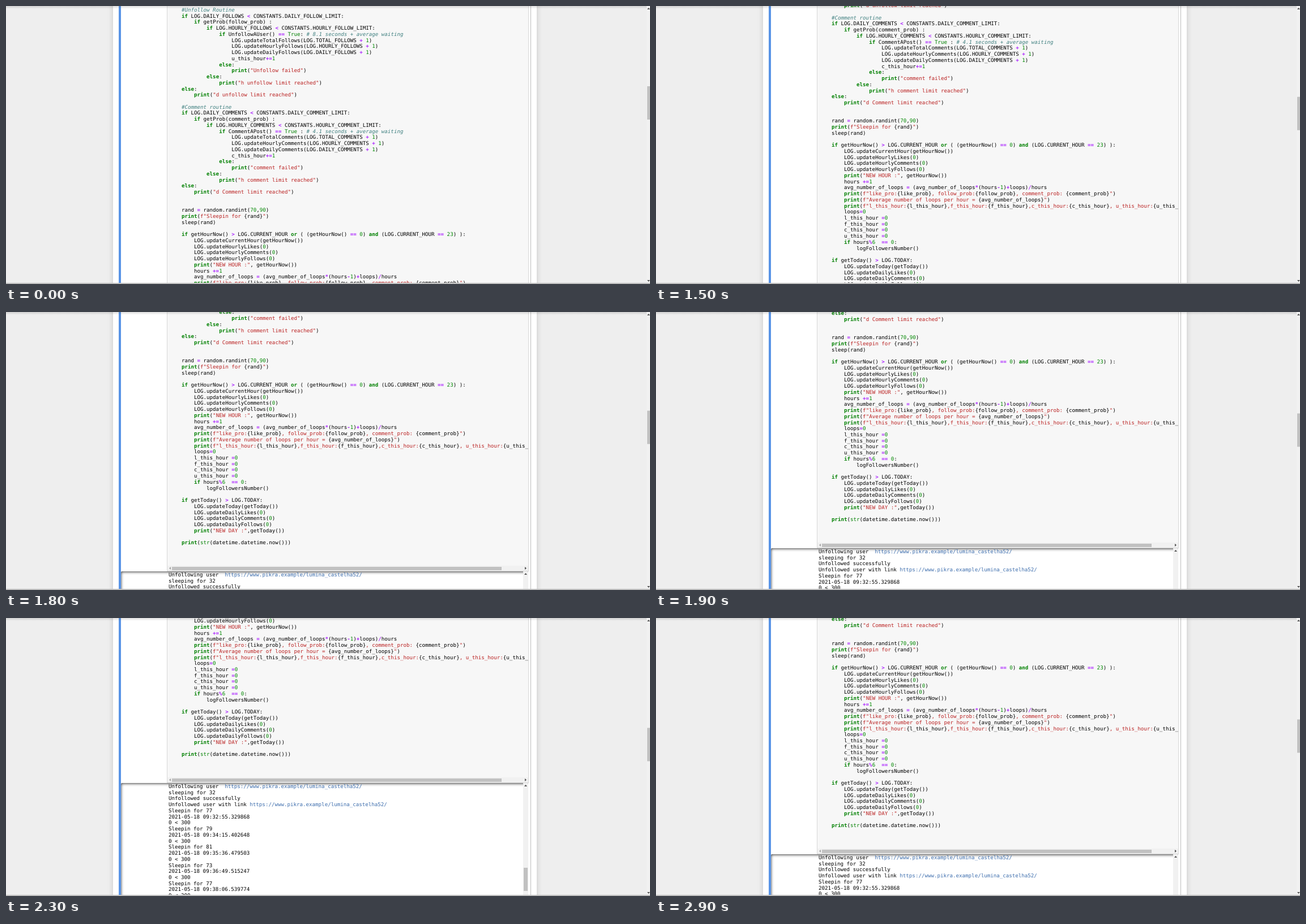
Recreate the animation shown at these times as an HTML page. Size 1137x492 px, loop 3 s.

```html
<!DOCTYPE html>
<html lang="en">
<head>
<meta charset="utf-8">
<title>Notebook scroll</title>
<style>
  html, body { margin: 0; width: 100%; height: 100%; overflow: hidden; background: #eee; }
  div, pre { position: absolute; margin: 0; box-sizing: border-box; }
  #stage { left: 0; top: 0; width: 1137px; height: 492px; overflow: hidden; background: #eee; }
  #paper { left: 189px; top: -20px; width: 748px; height: 540px; background: #fff;
           box-shadow: 0 0 8px 1px rgba(87,87,87,.22); }
  #bar { left: 199px; top: 0; width: 4px; height: 492px; background: #5994e6; }
  #edge { left: 926px; top: 0; width: 1px; height: 492px; background: #bcbcbc; }
  #page { left: 0; top: 0; width: 1137px; height: 1000px; }
  /* the tiny rotation keeps baselines from snapping to whole pixels */
  pre { font: 9.162px/10.727px "DejaVu Sans Mono", monospace; color: #000;
        text-rendering: geometricPrecision; white-space: pre; font-variant-ligatures: none;
        transform: rotate(.005deg); transform-origin: 0 0; }
  #input { left: 284px; top: -20px; width: 639px; height: 754px; overflow: hidden;
           background: #f7f7f7; border: 1px solid #d8d8d8; }
  #code { left: 25px; top: 22.3px; }
  #hbar { left: 0; bottom: 0; width: 637px; height: 9px; background: #f1f1f1; }
  #hbar .thumb { left: 8px; top: 2px; width: 582px; height: 6px; }
  #output { left: 203px; top: 734px; width: 719px; height: 213px; overflow: hidden; background: #fff;
            border-radius: 2px; box-shadow: inset 0 1px 5px rgba(0,0,0,.8); }
  #log { left: 84px; top: 2.2px; }
  #vbar { right: 0; top: 0; width: 9px; height: 213px; background: #f1f1f1; }
  #vbar .thumb { left: 1px; top: 150px; width: 7px; height: 41px; }
  #scrollbar { left: 1131px; top: 0; width: 6px; height: 490px; background: #f1f1f1; }
  #thumb { left: 1px; top: 142px; width: 5px; height: 59px; }
  #top { left: 0; top: 0; width: 1131px; height: 5px;
         background: linear-gradient(rgba(87,87,87,.2), rgba(87,87,87,0)); }
  #bottom { left: 0; top: 490px; width: 1137px; height: 2px; background: #bdbdbd; }
  .thumb { background: #c1c1c1; }
  .arrow { width: 5px; height: 3px; background: #505050; clip-path: polygon(50% 0, 100% 100%, 0 100%); }
  .down { transform: rotate(180deg); }
  .left { transform: rotate(-90deg); background: #a3a3a3; }
  .right { transform: rotate(90deg); }
  .comment { color: #408080; font-style: italic; }
  .string { color: #ba2121; }
  .value { color: #000; }
  .keyword { color: #008000; font-weight: bold; }
  .builtin { color: #008000; }
  .number { color: #008800; }
  .operator { color: #aa22ff; font-weight: bold; }
  .link { color: #3f6fae; }
</style>
</head>
<body>
<div id="stage">
  <div id="paper"></div>
  <div id="page">
    <div id="input">
      <pre id="code"></pre>
      <div id="hbar">
        <div class="arrow left" style="left:2px;top:3px"></div>
        <div class="thumb"></div>
        <div class="arrow right" style="left:630px;top:3px"></div>
      </div>
    </div>
    <div id="output">
      <pre id="log"></pre>
      <div id="vbar">
        <div class="arrow" style="left:2px;top:3px"></div>
        <div class="thumb"></div>
      </div>
    </div>
  </div>
  <div id="bar"></div>
  <div id="edge"></div>
  <div id="scrollbar">
    <div class="arrow" style="left:1px;top:3px"></div>
    <div class="thumb" id="thumb"></div>
    <div class="arrow down" style="left:1px;top:485px"></div>
  </div>
  <div id="top"></div>
  <div id="bottom"></div>
</div>
<script>
const code = `#Unfollow Routine
if LOG.DAILY_FOLLOWS < CONSTANTS.DAILY_FOLLOW_LIMIT:
    if getProb(follow_prob) :
        if LOG.HOURLY_FOLLOWS < CONSTANTS.HOURLY_FOLLOW_LIMIT:
            if UnfollowAUser() == True: # 8.1 seconds + average waiting
                LOG.updateTotalFollows(LOG.TOTAL_FOLLOWS + 1)
                LOG.updateHourlyFollows(LOG.HOURLY_FOLLOWS + 1)
                LOG.updateDailyFollows(LOG.DAILY_FOLLOWS + 1)
                u_this_hour+=1
            else:
                print("Unfollow failed")
        else:
            print("h unfollow limit reached")
else:
    print("d unfollow limit reached")

#Comment routine
if LOG.DAILY_COMMENTS < CONSTANTS.DAILY_COMMENT_LIMIT:
    if getProb(comment_prob) :
        if LOG.HOURLY_COMMENTS < CONSTANTS.HOURLY_COMMENT_LIMIT:
            if CommentAPost() == True : # 4.1 seconds + average waiting
                LOG.updateTotalComments(LOG.TOTAL_COMMENTS + 1)
                LOG.updateHourlyComments(LOG.HOURLY_COMMENTS + 1)
                LOG.updateDailyComments(LOG.DAILY_COMMENTS + 1)
                c_this_hour+=1
            else:
                print("comment failed")
        else:
            print("h comment limit reached")
else:
    print("d Comment limit reached")


rand = random.randint(70,90)
print(f"Sleepin for {rand}")
sleep(rand)

if getHourNow() > LOG.CURRENT_HOUR or ( (getHourNow() == 0) and (LOG.CURRENT_HOUR == 23) ):
    LOG.updateCurrentHour(getHourNow())
    LOG.updateHourlyLikes(0)
    LOG.updateHourlyComments(0)
    LOG.updateHourlyFollows(0)
    print("NEW HOUR :", getHourNow())
    hours +=1
    avg_number_of_loops = (avg_number_of_loops*(hours-1)+loops)/hours
    print(f"like_pro:{like_prob}, follow_prob:{follow_prob}, comment_prob: {comment_prob}")
    print(f"Average number of loops per hour = {avg_number_of_loops}")
    print(f"l_this_hour:{l_this_hour},f_this_hour:{f_this_hour},c_this_hour:{c_this_hour}, u_this_hour:{u_this_hour}")
    loops=0
    l_this_hour =0
    f_this_hour =0
    c_this_hour =0
    u_this_hour =0
    if hours%6  == 0:
        logFollowersNumber()

if getToday() > LOG.TODAY:
    LOG.updateToday(getToday())
    LOG.updateDailyLikes(0)
    LOG.updateDailyComments(0)
    LOG.updateDailyFollows(0)
    print("NEW DAY :",getToday())

print(str(datetime.datetime.now()))`;

const url = "https://www.pikra.example/lumina_castelha52/";
const naps = [
  [77, "09:32:55.329868"], [79, "09:34:15.402648"], [81, "09:35:36.479503"],
  [73, "09:36:49.515247"], [77, "09:38:06.539774"]
];
const log = [
  `Unfollowing user  ${url}`, "sleeping for 32", "Unfollowed successfully",
  `Unfollowed user with link ${url}`,
  ...naps.flatMap(([secs, time]) => [`Sleepin for ${secs}`, `2021-05-18 ${time}`, "0 < 300"])
].join("\n");

const $ = id => document.getElementById(id);
const escapeText = text => text.replace(/</g, "&lt;").replace(/>/g, "&gt;");
const span = (type, html) => `<span class="${type}">${html}</span>`;

const token = new RegExp([
  /(?<comment>#.*)/, /(?<string>f?"[^"]*")/, /\b(?<keyword>if|else|print|and|or)\b/,
  /\b(?<builtin>True|str)\b/, /\b(?<number>\d+)\b/, /(?<operator>[-+*\/%=<>]+)/
].map(part => part.source).join("|"), "g");

$("code").innerHTML = code.replace(token, (text, ...rest) => {
  const groups = rest.at(-1);
  const type = Object.keys(groups).find(name => groups[name] !== undefined);
  const html = escapeText(text);
  return span(type, type === "string" ? html.replace(/\{.*?\}/g, m => span("value", m)) : html);
});
$("log").innerHTML = escapeText(log).replaceAll(url, span("link", url));

// [time in ms, scroll position in px], held until the next entry
const duration = 3000;
const scrolls = [
  [0, 0],
  [1300, 4], [1400, 107], [1500, 158],
  [1700, 168], [1800, 275], [1900, 316],
  [2100, 325], [2200, 411], [2300, 442],
  [2700, 428], [2800, 342], [2900, 316], [3000, 316]
];
const thumbRatio = 0.1187;

function scrollWith(element, ratio) {
  element.animate(scrolls.map(([time, y]) => ({
    offset: time / duration,
    transform: `translateY(${y * ratio}px)`,
    easing: "steps(1, end)"
  })), { duration, iterations: Infinity });
}
scrollWith($("page"), -1);
scrollWith($("thumb"), thumbRatio);
</script>
</body>
</html>
```
